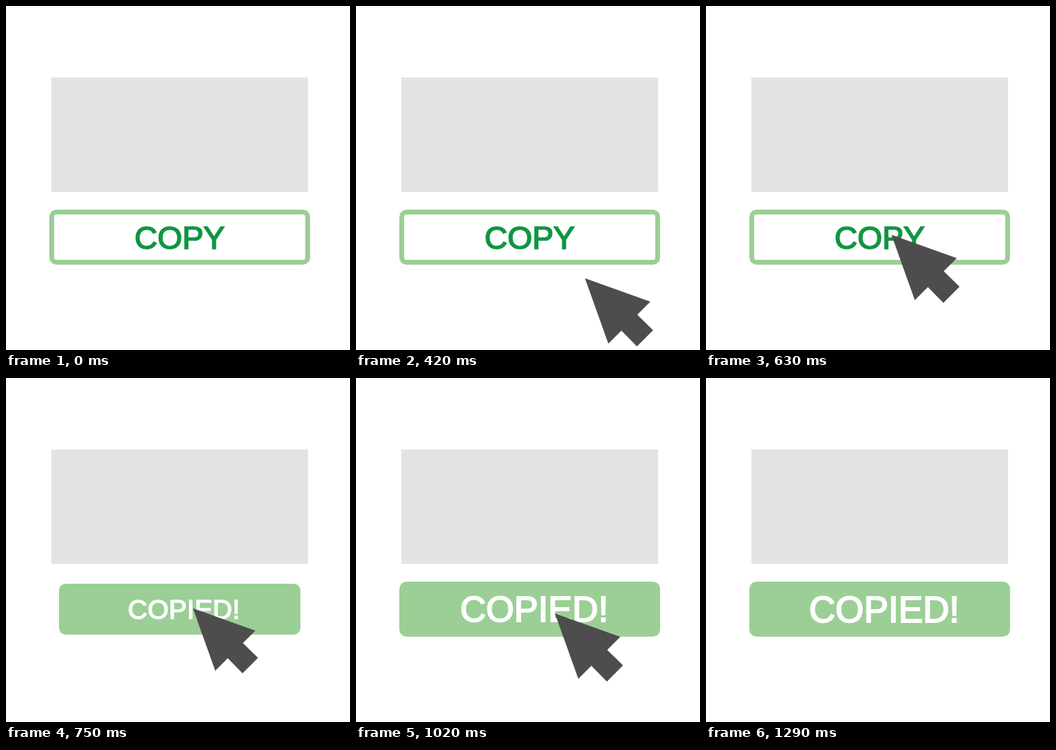
Recreate the animation shown at these times as an HTML page. Size 500 by 500 pixels, loop 5.4 s.

```html
<!DOCTYPE html>
<html lang="en">
<head>
<meta charset="utf-8">
<title>Copy button</title>
<style>
  html, body { margin: 0; width: 100%; height: 100%; overflow: hidden; background: #fff; }
  svg { display: block; width: 100%; height: 100%; }
  text { font-family: "Liberation Sans", Arial, sans-serif; text-anchor: middle; }
  #copy { font-size: 46.3px; fill: #109541; stroke: #109541; stroke-width: 1.7; }
  #copied { font-size: 53.2px; fill: #fff; stroke: #fff; stroke-width: 2; }
</style>
</head>
<body>
<svg viewBox="0 0 500 500">
  <rect x="66" y="104" width="373" height="166" fill="#e3e3e3"/>
  <g id="button">
    <rect id="frame" x="66.5" y="299.5" width="372" height="73" rx="7" stroke="#9bcf95" stroke-width="7"/>
    <text id="copy" x="252.4" y="352.6">COPY</text>
    <text id="copied" x="259" y="354.5">COPIED!</text>
  </g>
  <path id="cursor" fill="#4d4d4d" d="M0 0 95 34 76 53 99 75.5 75.5 99 53 76 34 95Z"/>
</svg>
<script>
const LOOP = 5400, STEP = 30;
const REST = { x: 269.5, y: 332.5 };
const [button, frame, copy, copied, cursor] =
  ["button", "frame", "copy", "copied", "cursor"].map(id => document.getElementById(id));

// Smooth progress from 0 to 1 between two times
function ease(t, start, end) {
  const u = Math.min(1, Math.max(0, (t - start) / (end - start)));
  return u * u * (3 - 2 * u);
}

const scaleAt = (s, x, y) => `translate(${x} ${y}) scale(${s}) translate(${-x} ${-y})`;
const show = (el, visible) => el.setAttribute("visibility", visible ? "visible" : "hidden");

function draw(t) {
  const done = t >= 750;
  const press = ease(t, 690, 780) - ease(t, 780, 870);

  button.setAttribute("transform", scaleAt(1 - 0.1 * press, 252.5, 336));
  frame.setAttribute("fill", done ? "#9bcf95" : "#fff");
  show(copy, !done);
  show(copied, done);
  copied.setAttribute("transform", scaleAt(0.8 + 0.2 * ease(t, 720, 1080), 259, 336));

  const enter = 171.5 * (1 - ease(t, 120, 630));
  const leave = ease(t, 945, 1410);
  const x = REST.x + enter + 282 * leave;
  const y = REST.y + enter + 138.5 * leave;
  cursor.setAttribute("transform", `translate(${x} ${y}) ${scaleAt(1 - 0.06 * press, 49, 49)}`);
  show(cursor, t >= 180 && t < 1290);
}

const origin = performance.now();
function tick() {
  const t = (performance.now() - origin) % LOOP;
  draw(Math.floor(t / STEP) * STEP);
  requestAnimationFrame(tick);
}
tick();
</script>
</body>
</html>
```
